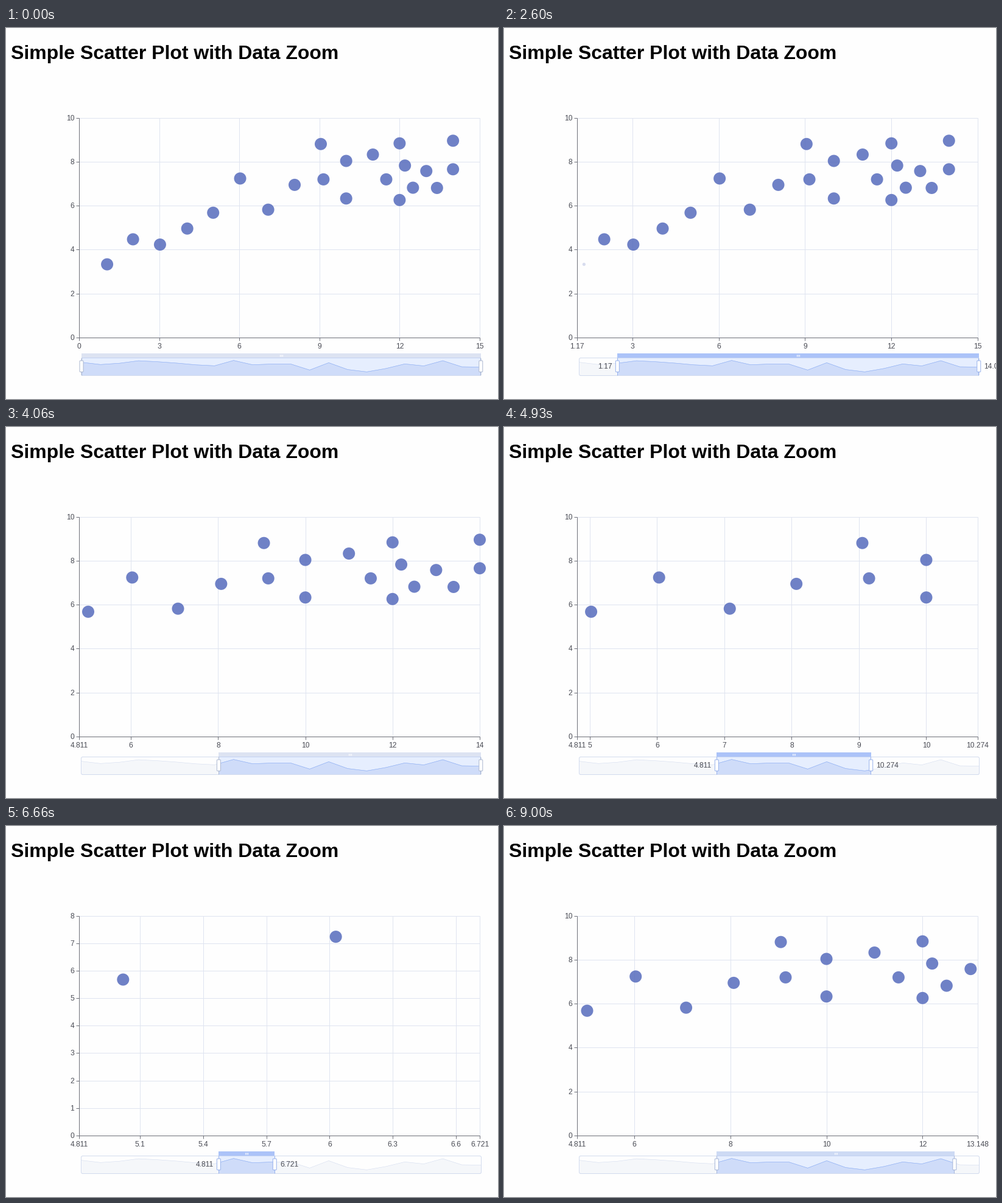
A matplotlib script for the animation above (9.06 s loop, 808 by 610 pixels).

```python
import math

import matplotlib.pyplot as plt
import numpy as np
from matplotlib.animation import FuncAnimation
from matplotlib.collections import LineCollection
from matplotlib.colors import to_rgb
from matplotlib.patches import FancyBboxPatch, Polygon, Rectangle

W, H, DPI = 808, 610, 100
PX = 72 / DPI                      # points per pixel
LOOP, TICK = 9060, 20
STEP = 200 / 3                     # the picture refreshes 15 times a second

LEFT, RIGHT, TOP, BOTTOM = 120, 778, 147.8, 508.8
BAR_L, BAR_R, BAR_T, BAR_B = 124, 779.8, 542, 571
X_MAX = 14

POINTS = np.array([
    (10, 8.04), (8.07, 6.95), (13, 7.58), (9.05, 8.81), (11, 8.33), (14, 7.66),
    (13.4, 6.81), (10, 6.33), (14, 8.96), (12.5, 6.82), (9.15, 7.2), (11.5, 7.2),
    (3.03, 4.23), (12.2, 7.83), (2.02, 4.47), (1.05, 3.33), (4.05, 4.96),
    (6.03, 7.24), (12, 6.26), (12, 8.84), (7.08, 5.82), (5.02, 5.68)])
XS, YS = POINTS.T

# key points (time, value) of the two slider handles
LOW_KEYS = [(1730, 0), (2464, .804), (2600, 1.33), (3380, 4.811)]
HIGH_KEYS = [(4600, 14), (4818, 10.994), (4918, 10.274), (5718, 7.847), (6230, 6.7),
             (6600, 6.7), (7232, 10.359), (7330, 10.62), (8330, 13.148)]
HOVERS = [(1650, 3790), (4190, 8935)]
FADE = 200

BACK, DOT, INK, AXIS, GRID = "#fefefe", "#566bbd", "#4a4c55", "#6e7079", "#dfe4f0"
PALE, BLUE, STEEL = "#d2dbee", "#8fb0f7", "#acb8d1"


def ease_out(p):
    return 1 - (1 - min(max(p, 0), 1)) ** 3


def mix(a, b, p):
    return tuple(u + (v - u) * p for u, v in zip(to_rgb(a), to_rgb(b)))


def glide(t, keys):
    """Smooth cubic path through the keys, at rest at both ends."""
    times, values = np.transpose(keys)
    if t <= times[0]:
        return float(values[0])
    if t >= times[-1]:
        return float(values[-1])
    slopes = np.diff(values) / np.diff(times)
    inner = np.sign(slopes[1:]) * np.sqrt(np.maximum(slopes[1:] * slopes[:-1], 0))
    speed = [0, *inner, 0]
    i = np.searchsorted(times, t, side="right") - 1
    span = times[i + 1] - times[i]
    p = (t - times[i]) / span
    return float(values[i] + (values[i + 1] - values[i]) * p * p * (3 - 2 * p)
                 + span * p * (1 - p) * (speed[i] * (1 - p) - speed[i + 1] * p))


def handles(t):
    return glide(t, LOW_KEYS), glide(t, HIGH_KEYS)


def nice(value):
    base = 10 ** math.floor(math.log10(value))
    f = value / base
    return base * (1 if f < 1.5 else 2 if f < 2.5 else 3 if f < 4 else 5 if f < 7 else 10)


def layout(lo, hi):
    """Ticks and extents of both axes for a zoom window."""
    step = nice((hi - lo) / 5)
    end = math.ceil(hi / step) * step if hi > X_MAX - 1e-6 else hi
    inner = np.arange(math.floor(lo / step + 1e-9) + 1, math.ceil(end / step - 1e-9)) * step
    inside = (XS >= lo) & (XS <= hi)
    y_max = YS[inside].max()
    y_step = nice(y_max / 5)
    y_end = math.ceil(y_max / y_step) * y_step
    return {"lo": lo, "end": end, "ticks": [lo, *inner, end], "inside": inside,
            "y_end": y_end, "y_ticks": np.arange(0, y_end + y_step / 2, y_step)}


def to_x(v, lo, end):
    return LEFT + (v - lo) / (end - lo) * (RIGHT - LEFT)


def to_y(v, end):
    return BOTTOM - v / end * (BOTTOM - TOP)


def bar_x(v):
    return BAR_L + v / X_MAX * (BAR_R - BAR_L)


def hover(t):
    """Emphasis strength and whether the slider labels show."""
    for on, off in HOVERS:
        if on <= t < off:
            return ease_out((t - on) / FADE), True
        if off <= t < off + FADE:
            return 1 - ease_out((t - off) / FADE), False
    return 0, False


fig = plt.figure(figsize=(W / DPI, H / DPI), dpi=DPI, facecolor=BACK)
ax = fig.add_axes([0, 0, 1, 1])
ax.set(xlim=(0, W), ylim=(H, 0))
ax.axis("off")


def label(x, y, align, size=12, **kw):
    style = {"color": INK, "family": "Liberation Sans", "fontsize": size * PX,
             "ha": align, "va": "baseline", "zorder": 9, **kw}
    return ax.text(x, y, "", **style)


def segments(color, z):
    return ax.add_collection(LineCollection([], colors=color, linewidths=PX, zorder=z))


def box(x, y, w, h, r, z, **kw):
    return ax.add_patch(FancyBboxPatch((x, y), w, h, zorder=z, linewidth=PX,
                                       boxstyle=f"round,pad=0,rounding_size={r}", **kw))


def band(y, h, z, **kw):
    return ax.add_patch(Rectangle((0, y), 1, h, lw=0, zorder=z, **kw))


label(8, 51, "left", 32, weight="bold", color="black").set_text(
    "Simple Scatter Plot with Data Zoom")
grid = segments(GRID, 1)
ticks = segments(AXIS, 2)
frame = segments(AXIS, 2)
base, roof = round(BOTTOM), round(TOP)
frame.set_segments([[(LEFT, roof), (LEFT, base)], [(LEFT, base), (RIGHT, base)]])
dots = ax.scatter(XS, YS, linewidths=0, zorder=3)
x_labels = [label(0, 527.3, "center") for _ in range(12)]
y_labels = [label(112.3, 0, "right") for _ in range(12)]

# slider: data shadow, window, move bar and handles
margin = (YS.max() - YS.min()) * .3
shadow_x = np.linspace(BAR_L, BAR_R, len(YS))
shadow_y = BAR_B - 30 * (YS - YS.min() + margin) / (YS.max() - YS.min() + 2 * margin)
ax.fill_between(shadow_x, shadow_y, BAR_B, color=PALE, alpha=.2, lw=0, zorder=4)
ax.plot(shadow_x, shadow_y, color=PALE, lw=.6 * PX, zorder=4)
box(123.5, 542.5, 657, 29, 2.5, 4, fc="none", ec=PALE)
window = band(BAR_T, BAR_B - BAR_T, 5, fc=(.53, .686, 1), alpha=.2)
mover = band(535, 7, 6, alpha=.75)
area = ax.add_patch(Polygon([(0, 0), (1, 0), (1, 1)], fc=BLUE, alpha=.2, lw=0, zorder=5))
curve, = ax.plot([], [], color=BLUE, lw=.6 * PX, zorder=5)
grip = segments("white", 7)
stems = segments(STEEL, 7)
knobs = [box(0, 547, 6, 18.5, 1.2, 8, fc="white", ec=STEEL) for _ in range(2)]
low_label = label(0, 560.2, "right")
high_label = label(0, 560.2, "left")


def text_width(s):
    return 6.67 * len(s) - 3.34 * s.count(".")


def draw_axes(now, lo, end, y_end, places):
    xs = [to_x(v, lo, end) for v in now["ticks"]]
    ys = [round(to_y(v, y_end)) for v in now["y_ticks"]]
    xs[0], xs[-1] = LEFT, RIGHT
    columns = [round(x) for x in xs if x <= RIGHT]
    grid.set_segments([[(x, roof), (x, base)] for x in columns[1:]]
                      + [[(LEFT, y), (RIGHT, y)] for y in ys if y >= roof])
    ticks.set_segments([[(x, base), (x, base + 5)] for x in columns]
                       + [[(LEFT - 5, y), (LEFT, y)] for y in ys])
    names = [f"{v:.{places}f}".rstrip("0").rstrip(".") or "0" for v in now["ticks"]]

    def clash(i, j):
        return xs[j] - xs[i] < (text_width(names[i]) + text_width(names[j])) / 2

    # an end label gives way to its neighbour
    hidden = {i for i, j, k in ((0, 0, 1), (len(xs) - 1, -2, -1)) if clash(j, k)}
    for i, item in enumerate(x_labels):
        shown = i < len(xs) and i not in hidden and xs[i] <= RIGHT
        item.set_visible(shown)
        if shown:
            item.set_text(names[i])
            item.set_x(xs[i])
    for i, item in enumerate(y_labels):
        item.set_visible(i < len(ys))
        if i < len(ys):
            item.set_text(f"{now['y_ticks'][i]:g}")
            item.set_y(ys[i] + 4.2)


def draw_dots(now, before, lo, end, y_end, p):
    stay, was = now["inside"], before["inside"]
    x = np.where(stay, to_x(XS, lo, end), to_x(XS, before["lo"], before["end"]))
    y = np.where(stay, to_y(YS, y_end), to_y(YS, before["y_end"]))
    scale = np.where(stay, np.where(was, 1, p), np.where(was, 1 - p, 0))
    dots.set_offsets(np.column_stack([x, y]))
    dots.set_sizes((20 * PX * scale) ** 2)
    dots.set_facecolor([(*to_rgb(DOT), .85 * s) for s in scale])


def draw_slider(t, zoom, places):
    a, b = (bar_x(v) for v in handles(t))
    glow, show = hover(t)
    for item in (window, mover):
        item.set_x(a)
        item.set_width(b - a)
    mover.set_facecolor(mix(PALE, BLUE, glow))
    mid = (a + b) / 2
    grip.set_segments([[(mid + d, 537), (mid + d, 540)] for d in (-2, 0, 2)])
    inner = (shadow_x > a) & (shadow_x < b)
    x = np.concatenate([[a], shadow_x[inner], [b]])
    y = np.interp(x, shadow_x, shadow_y)
    curve.set_data(x, y)
    area.set_xy([(a, BAR_B), *zip(x, y), (b, BAR_B)])
    edge = mix(STEEL, BLUE, .7 * glow)
    stems.set_segments([[(v - .5, BAR_T), (v - .5, BAR_B)] for v in (a, b)])
    stems.set_color(edge)
    for knob, v in zip(knobs, (a, b)):
        knob.set_x(v - 3)
        knob.set_edgecolor(edge)
    for item, v, x in zip((low_label, high_label), zoom, (a - 8.5, b + 8.7)):
        item.set_visible(show)
        item.set_text(f"{v:.{places}f}")
        item.set_x(x)


def update(i):
    k = math.floor((i * TICK + 17) / STEP)
    t = int(k * STEP / 10 + 1e-6) * 10
    # the chart takes over the handle positions every 100 ms and eases there
    anchor = 2564 if t < 4300 else 4918 if t < 6450 else 7232
    taken = anchor + (t - anchor) // 100 * 100
    p = ease_out((t - taken) / 100)
    zoom = handles(taken)
    now, before = layout(*zoom), layout(*handles(taken - 100))
    lo, end, y_end = (before[key] + (now[key] - before[key]) * p
                      for key in ("lo", "end", "y_end"))
    places = 2 if zoom[1] - zoom[0] >= 10 else 3
    draw_axes(now, lo, end, y_end, places)
    draw_dots(now, before, lo, end, y_end, p)
    draw_slider(t, zoom, places)
    return []


anim = FuncAnimation(fig, update, frames=LOOP // TICK, interval=TICK,
                     init_func=lambda: update(0), repeat=True, repeat_delay=0, blit=False)
plt.show()
```
